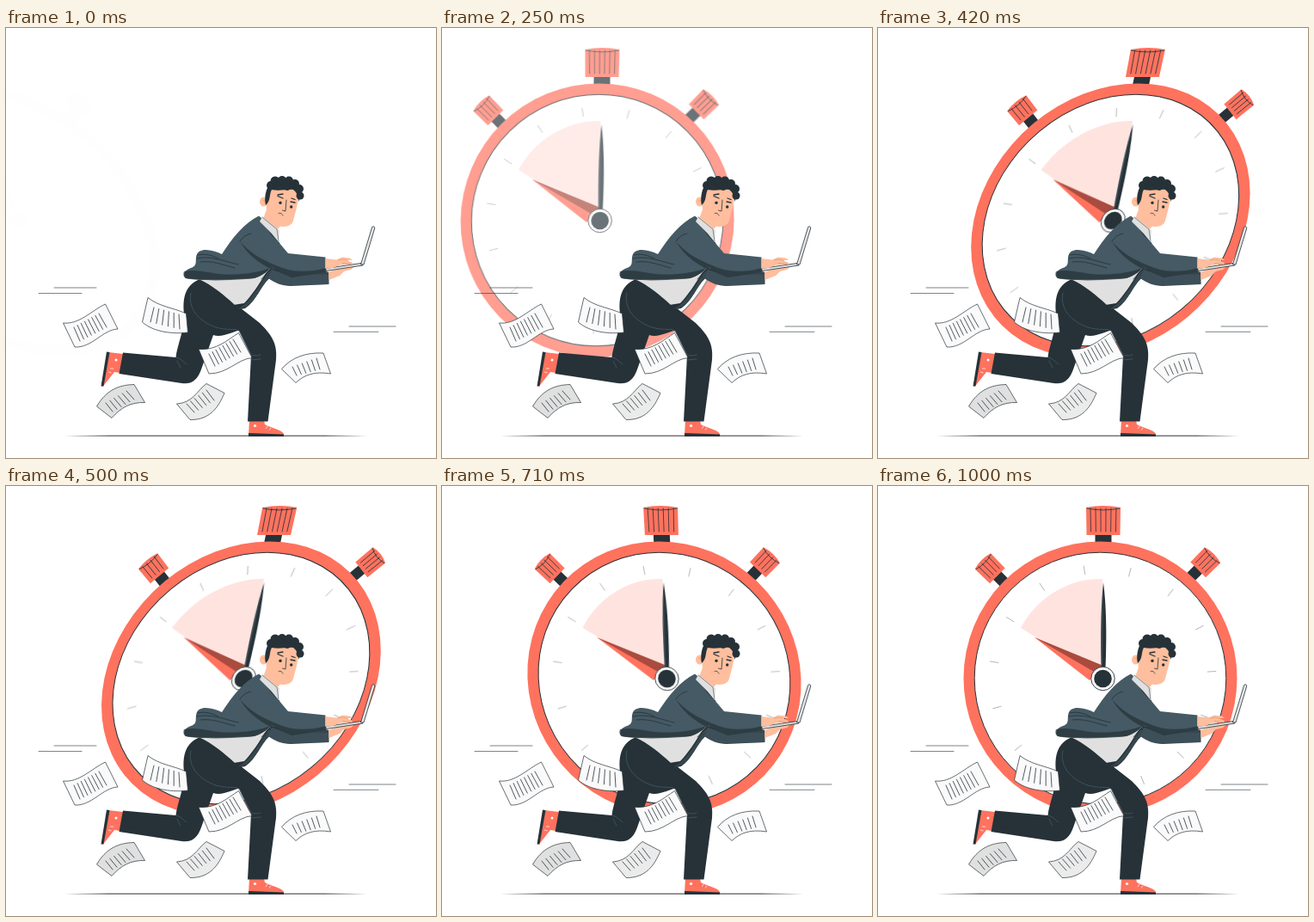
An HTML page that plays this animation: 500x500 px, repeating every 1040 ms.

```html
<!DOCTYPE html>
<html lang="en">
<head>
<meta charset="utf-8">
<title>Running late</title>
<style>
html, body { margin: 0; width: 100%; height: 100%; overflow: hidden; background: #fff; }
svg { display: block; width: 100vw; height: 100vh; }
.ink { fill: none; stroke: #263238; stroke-width: .8; stroke-linecap: round; stroke-linejoin: round; }
.thin { fill: none; stroke: #263238; stroke-width: .6; }
.dark { fill: #263238; }
.coral { fill: #ff725e; }
.skin { fill: #ffbe9d; }
.shirt { fill: #e0e0e0; }
.cloth { fill: #455a64; }
.shade { fill: #37474f; }
</style>
</head>
<body>
<svg viewBox="0 0 500 500" xmlns="http://www.w3.org/2000/svg">
  <g id="clock" opacity="0">
    <g id="crowns"></g>
    <circle class="coral" cx="258.5" cy="223.5" r="159"/>
    <circle cx="258.5" cy="223.5" r="146.3" fill="#fff" stroke="#263238"/>
    <g id="ticks" class="thin" opacity=".55"></g>
    <path d="M261 224 166 165C184 130 222 107 261 108Z" fill="#ffe3df"/>
    <path class="coral" d="M182 176 246 226 260 211Z"/>
    <path d="M182 176 253 217 262 209Z" fill="#a94b3e"/>
    <path class="shade" d="M262 112Q258 150 259.500 212H262Z"/>
    <path class="dark" d="M262 112Q267 150 264.500 212H261Z"/>
    <circle cx="261.500" cy="224" r="13.700" fill="#fff" stroke="#263238" stroke-width=".9"/>
    <circle class="dark" cx="261.500" cy="224" r="10.300"/>
  </g>

  <g class="ink" stroke-opacity=".75">
    <path d="M56 302H105M38 308.500H88M399 347H453M381 353.300H433"/>
  </g>
  <path d="M68 474.200 120 473.500H370L420 474.200 370 474.900H120Z" fill="#757575"/>
  <g id="backPapers"></g>

  <g id="runner">
    <!-- rear leg -->
    <path class="coral" d="M119 377 136.500 379 132.500 401 126 400 113 416.500 111 416Z"/>
    <path class="dark" d="M117 376.500 120.500 377 113.500 416.500 110.500 416.500Z"/>
    <circle cx="128" cy="386" r="1.500" fill="#fff"/>
    <path d="M125 396 121 396M122.500 401 119 400" stroke="#fff" stroke-width=".7"/>
    <path class="dark" d="M224 293C209 299 205 313 207 332 208 351 199 368 197.500 383L136 377.500 131.500 402 204 413C217 415 223 408 227 397L241 357 262 335Z"/>
    <path class="ink" style="stroke:#455a64" d="M198 383C203 384 206 388 210 391M199 387 203 395"/>
    <!-- front leg -->
    <path class="coral" d="M283 456H300L301 461C308 465 321 467 323 472V473.500H282Z"/>
    <path class="dark" d="M282 471 323 472.500V475H282Z"/>
    <circle cx="289.500" cy="462.500" r="1.600" fill="#fff"/>
    <path d="M302 466 304 463M306 467.500 308 465" stroke="#fff" stroke-width=".7"/>
    <path class="dark" d="M226 292C212 297 206 311 208 326 211 340 223 350 241 357 252 361 267 351 271 352L285 381 281 457.500H304.500L314 386C316 366 308 356 295 343L268 322 258 296Z"/>
    <path class="ink" style="stroke:#455a64" d="M215 308C211 326 224 341 244 348 257 352 267 349 271 352L285 380M285 381C288 380 292 382 296 380M285 386 296 385"/>
    <!-- shirt and jacket -->
    <path class="shirt" d="M224 292 308 276 302 293 277 323 266 322C254 311 240 299 224 292Z"/>
    <path class="dark" d="M310 277 306 291C295 301 291 318 278 326L267 328 264.500 322 277 320C286 311 294 298 303 284Z"/>
    <path class="shade" d="M310 280 306 291C296 301 291 317 279 324L269 327 278 321C287 312 296 298 304 285Z"/>
    <path class="shade" d="M309 279 326 283 372 283 375.500 284V298L331 300C321 300 312 296 305 291Z"/>
    <path class="cloth" d="M309 281 326 286 375 287 375 298 331 299.500C321 299 312 296 305 291Z" opacity=".45"/>
    <path class="cloth" d="M294 218.500C277 227 264 243 251 263 241 258 226 255 222 263 219 270 224 276 215 279 208 281 205 287 209 291 228 294 266 292 289 291 299 287 305 283 309 278L330 289 371.500 284V266.500L328 262 317 249 312 233Z"/>
    <path class="dark" d="M207 283C222 280 236 285 248 286 269 288 292 285 307 279 300 288 290 292 279 292 255 294 220 294 209 291 206 289 206 286 207 283Z" opacity=".72"/>
    <path class="dark" d="M272 248C282 266 300 278 318 284L332 290 372 284V279C351 285 331 284 314 276 296 269 282 260 272 248Z" opacity=".72"/>
    <path class="ink" d="M222 268C238 264 256 272 270 275M226 272C240 270 254 276 266 279M296 222 310 242 318 250M304 284 297 292M285 239C280 240 275 243 272 248M223 264C231 262 239 264 247 268"/>
    <!-- neck and head -->
    <path class="skin" d="M303 211 299 222C303 229 310 232 315 235L322 227Z"/>
    <path class="shirt" d="M298 219 315 233 318 235 317 249 309 239 295 225Z"/>
    <path class="ink" style="stroke-width:.5" d="M298 220 315 234 317 248"/>
    <ellipse class="skin" cx="299.500" cy="202" rx="4.500" ry="5.500"/>
    <path d="M298 201C300 199 302 201 302 204" fill="none" stroke="#eb996e" stroke-width=".8"/>
    <path class="skin" d="M305 187C317 181 334 182 340 190 341 201 336 216 334 224 332 231 324 232 316 230 306 226 301 212 303 202Z"/>
    <path class="dark" d="M302 206C300 197 302 188 307 180L322 176 340 183 343 195 340 202C340 195 338 191 334 188 326 187 319 190 309 188 306 193 308 201 302 206Z"/>
    <g id="curls" class="dark"></g>
    <circle class="dark" cx="319" cy="203.300" r="1.700"/>
    <circle class="dark" cx="331.700" cy="208" r="1.700"/>
    <path class="ink" style="stroke-width:1.300" d="M316 195.500 322 198M331 202 336 203M316 194 322 193M332 198 336 199.500"/>
    <path class="ink" d="M326 200 325 213 321.500 212M317 215.500C319 214.500 321 216 322 218"/>
    <!-- hands and laptop -->
    <path class="skin" d="M375 284 389 278.500 405 277.500 401 281 393 283 388 288 375.500 293Z"/>
    <path d="M372 279.500 413 273.500 415 276 372 282.500Z" fill="#e0e0e0" stroke="#263238" stroke-width=".8"/>
    <path d="M425.500 232C426 230 429 230.500 428.700 233L416 275 412.500 275Z" fill="#e6e6e6" stroke="#263238" stroke-width=".8"/>
    <path class="skin" d="M371.500 268 384 269.500 391 266.500 400 267.500 403 270 396 270 403 273 402 275 389 275.500 380 279 371.500 280Z"/>
    <path d="M386 270 392 269 398 270.500M391 273.500 402 274" fill="none" stroke="#eb996e" stroke-width=".8"/>
  </g>
  <g id="frontPapers"></g>
</svg>
<script>
const $ = id => document.getElementById(id);
const range = n => Array.from({ length: n }, (_, i) => i);
const lerp = (a, b, p) => a + (b - a) * p;

// Watch buttons: neck plus a ribbed cap, drawn upright and then turned.
function crown(x, y, angle, w, h, ribs, neckW, neckH) {
  const a = w / 2, b = h / 2;
  const lines = range(ribs).map(i => {
    const rx = lerp(-a + 5, a - 5, i / (ribs - 1));
    return `M${rx} ${-b + 2}L${rx * .96} ${b - 4}`;
  }).join('');
  return `<g transform="translate(${x} ${y}) rotate(${angle})">
    <rect class="dark" x="${-neckW / 2}" y="${b - 1}" width="${neckW}" height="${neckH}"/>
    <path class="coral" d="M${-a} ${-b + 1}Q0 ${-b - 3} ${a} ${-b + 1}L${a - .5} ${b}H${-a + .5}Z"/>
    <path class="ink" d="${lines}M${-a + 1} ${-b + 2}Q0 ${-b + 6} ${a - 1} ${-b + 2}"/></g>`;
}
$('crowns').innerHTML = crown(262, 40.5, 0, 40, 33, 6, 19, 12)
  + crown(381, 88.5, 45, 26, 25, 4, 13, 14)
  + crown(130, 95.500, -45, 26, 25, 4, 13, 14);

$('ticks').innerHTML = range(15).map(i =>
  `<path d="M261 91V101.500" transform="rotate(${i * 24 - 9.500} 261 223.500)"/>`).join('');

const curls = [[308, 183, 5], [313, 178, 5.5], [321, 177, 5], [329, 177.500, 5], [336, 181, 5], [341, 187, 5], [342, 195, 4.500], [327, 184, 5]];
$('curls').innerHTML = curls.map(([x, y, r]) => `<circle cx="${x}" cy="${y}" r="${r}"/>`).join('');

// A sheet with n text strokes running from the first stroke to the last.
function paper(outline, fill, n, first, last) {
  const lines = range(n).map(i => {
    const q = first.map((v, k) => lerp(v, last[k], i / (n - 1)));
    return `M${q[0]} ${q[1]}L${q[2]} ${q[3]}`;
  }).join('');
  return `<path d="${outline}" fill="${fill}" stroke="#263238" stroke-width=".7" stroke-linejoin="round"/><path class="ink" d="${lines}"/>`;
}
$('backPapers').innerHTML =
  paper('M66.500 343C85 345 99 329 115.500 321L130 350C112 351 100 372 80 371Z', '#fafafa', 8, [79, 348, 86, 364], [108, 332, 117, 348])
  + paper('M320.500 396.500C332 383 349 377 369 378L377.500 402C359 399 347 403 337 412.500Z', '#fafafa', 6, [333, 394, 338, 404], [361, 384, 365, 397])
  + paper('M105.500 440C116 422 130 415 149 414.500L161.500 435.500C145 435 134 441 123 453.500Z', '#e0e0e0', 6, [116, 436, 124, 446], [140, 422, 149, 432])
  + paper('M198.500 437C217 436 222 422 233 413.500L254 424.500C247 441 237 456 214 455.500Z', '#ebebeb', 6, [210, 437, 219, 447], [233, 421, 242, 433]);
$('frontPapers').innerHTML =
  paper('M165 313.500C178 324 194 325 209.500 332L211.500 354C195 356 172 354 158.500 342Z', '#fafafa', 6, [172, 325, 168, 342], [201, 333, 202, 350])
  + paper('M224 373.500C245 375 257 363 270.500 354.500L286 383.500C269 385 258 402 236 402Z', '#fafafa', 8, [236, 379, 243, 393], [264, 362, 273, 377]);

const curve = (u, a, b) => 3 * (1 - u) ** 2 * u * a + 3 * (1 - u) * u * u * b + u ** 3;
function ease(x) {
  let lo = 0, hi = 1;
  for (let i = 0; i < 30; i++) {
    const mid = (lo + hi) / 2;
    if (curve(mid, .36, .5) < x) lo = mid; else hi = mid;
  }
  return curve(lo, -.01, 1.38);
}

// time, shift, skew in degrees, opacity
const steps = [[0, -250, 20, 0], [600, 0, -10, 1], [800, 0, 2, 1], [1000, 0, 0, 1]];
const LOOP = 1040, TICK = 1000 / 24, LEAD = 33, PIVOT = 225;

function pose(ms) {
  const i = steps.findIndex(s => s[0] > ms);
  if (i < 0) return steps[steps.length - 1];
  const a = steps[i - 1], b = steps[i];
  const p = ease((ms - a[0]) / (b[0] - a[0]));
  return a.map((v, k) => lerp(v, b[k], p));
}

function draw(ms) {
  const tick = Math.min(24, Math.floor((ms % LOOP + 5) / TICK));
  const [, shift, skew, alpha] = pose(tick * TICK + LEAD);
  const k = Math.tan(skew * Math.PI / 180);
  $('clock').setAttribute('transform', `matrix(1 0 ${k} 1 ${shift - k * PIVOT} 0)`);
  $('clock').setAttribute('opacity', Math.max(0, Math.min(1, alpha)));
}

const start = performance.now();
function run() {
  draw(performance.now() - start);
  requestAnimationFrame(run);
}
run();
</script>
</body>
</html>
```
